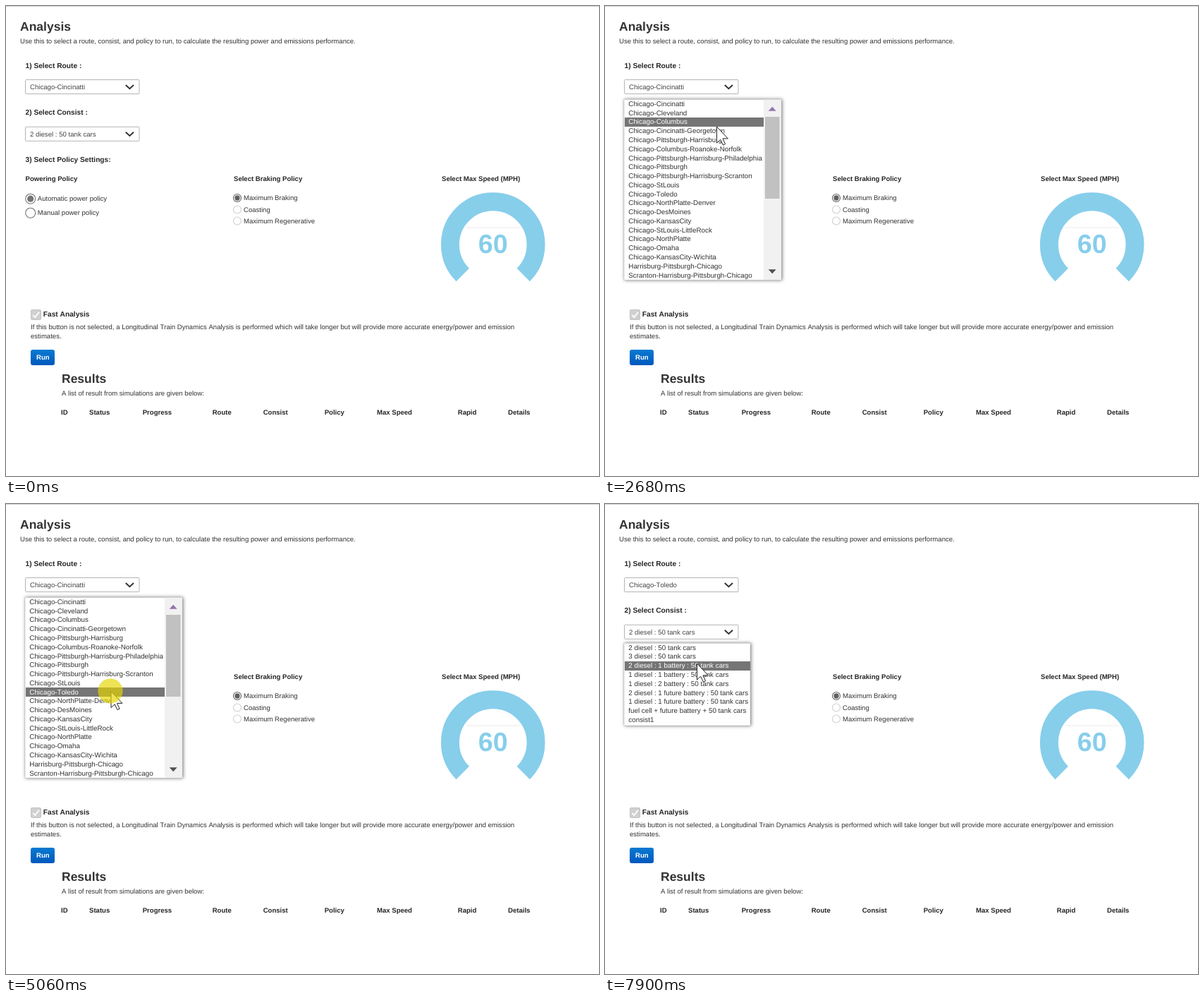
These frames come from a looping animation (841 by 666 pixels, 7.99 s). An HTML page:

```html
<!DOCTYPE html>
<html lang="en">
<head>
<meta charset="utf-8">
<title>Analysis</title>
<style>
  html, body { margin: 0; width: 100%; height: 100%; overflow: hidden; background: #fff; }
  svg { display: block; }
  text {
    font-family: "Liberation Sans", Arial, sans-serif;
    font-size: 9.57px;
    font-kerning: none;
    fill: #333;
    text-rendering: geometricPrecision;
    white-space: pre;
  }
  .title { font-size: 17.5px; font-weight: bold; }
  .head { font-size: 10.2px; font-weight: bold; fill: #262626; }
  .bold { font-weight: bold; fill: #262626; }
  .field { font-size: 9.63px; fill: #444; }
  .option { font-size: 9.83px; }
  .option.on { fill: #fff; }
  .speed { font-size: 37.5px; font-weight: bold; fill: #87ceeb; text-anchor: middle; }
  .run { font-weight: bold; fill: #fff; }
  .list { filter: drop-shadow(1px .7px 2.6px rgba(0, 0, 0, .55)); }
</style>
</head>
<body>
<svg id="stage" width="841" height="666" viewBox="0 0 841 666">
  <defs>
    <linearGradient id="blue" x1="0" y1="0" x2="0" y2="1">
      <stop offset="0" stop-color="#0a7ad2"/>
      <stop offset="1" stop-color="#0058bd"/>
    </linearGradient>
  </defs>
  <rect width="841" height="666" fill="#fff"/>
  <rect width="841" height="1" fill="#d2d2d2"/>
  <g id="page"></g>
  <g id="lists"></g>
  <path id="cursor" d="M.5 .5V23.6L5.7 18.8L9.4 26.6L12.6 25.2L9 17.4H16.4Z"
        fill="#fff" stroke="#222" stroke-width="1"/>
  <circle id="click" r="17.6"/>
</svg>
<script>
const LOOP = 7990, ROW = 12.77;
const $ = id => document.getElementById(id);
const page = $('page');

function add(parent, tag, attrs, text) {
  const el = document.createElementNS('http://www.w3.org/2000/svg', tag);
  for (const key in attrs) el.setAttribute(key, attrs[key]);
  if (text) el.textContent = text;
  parent.append(el);
  return el;
}
const label = (x, y, text, cls = '') => add(page, 'text', { x, y, class: cls }, text);

function select(y, text) {
  add(page, 'rect', { x: 27.5, y, width: 161.5, height: 20, rx: 1, fill: '#fff', stroke: '#b4b4b4' });
  add(page, 'path', { d: `M169.8 ${y + 7.5}L175.4 ${y + 12.7}L181 ${y + 7.5}`, fill: 'none', stroke: '#333', 'stroke-width': 2 });
  return label(34, y + 13.6, text, 'field');
}

function radio(x, y, r, color, on) {
  add(page, 'circle', { cx: x, cy: y, r, fill: '#fff', stroke: color, 'stroke-width': 1.1 });
  if (on) add(page, 'circle', { cx: x, cy: y, r: r * .66, fill: color });
}

function list(top, width, height, items, barAt) {
  const g = add($('lists'), 'g', {});
  add(g, 'rect', { x: 27, y: top, width, height, fill: '#fff', stroke: '#b8b8b8', 'stroke-width': .5, class: 'list' });
  const rowWidth = barAt ? barAt - 27.5 : width - 1;
  const bar = add(g, 'rect', { x: 27.5, width: rowWidth, height: ROW, fill: '#757575', 'shape-rendering': 'crispEdges' });
  const rows = items.map((text, i) =>
    add(g, 'text', { x: 33.3, y: top + ROW * i + 9.5, class: 'option' }, text));
  return {
    g,
    show(open, index) {
      g.style.display = open ? '' : 'none';
      bar.setAttribute('y', top + ROW * index);
      rows.forEach((row, i) => row.classList.toggle('on', i === index));
    }
  };
}

// Page
label(20, 35.3, 'Analysis', 'title');
label(20, 53.2, 'Use this to select a route, consist, and policy to run, to calculate the resulting power and emissions performance.');
label(27.5, 87.5, '1) Select Route :', 'head');
label(27.5, 154, '2) Select Consist :', 'head');
label(27.5, 221, '3) Select Policy Settings:', 'head');
const route = select(104.5, 'Chicago-Cincinatti');
select(171.3, '2 diesel : 50 tank cars');

label(27.5, 247.8, 'Powering Policy', 'bold');
radio(34.7, 273.2, 7, '#747474', true);
radio(34.7, 293.2, 7, '#747474');
label(44.8, 276, 'Automatic power policy');
label(44.8, 296, 'Manual power policy');

label(323, 247.8, 'Select Braking Policy', 'bold');
radio(328, 272, 5.5, '#606060', true);
radio(328, 288.5, 5.5, '#cfcfcf');
radio(328, 304.5, 5.5, '#cfcfcf');
label(337, 275.2, 'Maximum Braking');
label(337, 291.7, 'Coasting');
label(337, 307.5, 'Maximum Regenerative');

label(618, 247.8, 'Select Max Speed (MPH)', 'bold');
const arm = 60.8 * Math.SQRT1_2;
add(page, 'path', {
  d: `M${690.7 - arm} ${338 + arm}A60.8 60.8 0 1 1 ${690.7 + arm} ${338 + arm}`,
  fill: 'none', stroke: '#87ceeb', 'stroke-width': 26
});
add(page, 'rect', { x: 652, y: 313.5, width: 77, height: 1, fill: '#ececec' });
label(690.7, 350, '60', 'speed');

add(page, 'rect', { x: 35.5, y: 430.5, width: 14, height: 14, rx: 1.5, fill: '#d0d0d0', stroke: '#c4c4c4' });
add(page, 'path', { d: 'M38.3 437.8L41.3 441L47 433.7', fill: 'none', stroke: '#fff', 'stroke-width': 1.8 });
label(52.8, 440, 'Fast Analysis', 'head');
label(35, 458, 'If this button is not selected, a Longitudinal Train Dynamics Analysis is performed which will take longer but will provide more accurate energy/power and emission');
label(35, 470.5, 'estimates.');
add(page, 'rect', { x: 35, y: 487, width: 34, height: 22, rx: 3, fill: 'url(#blue)' });
label(43, 501, 'Run', 'run');

label(79, 534.2, 'Results', 'title');
label(79, 552, 'A list of result from simulations are given below:');
[[78, 'ID'], [118, 'Status'], [193.7, 'Progress'], [292.7, 'Route'], [364.7, 'Consist'],
 [451.7, 'Policy'], [526, 'Max Speed'], [640.8, 'Rapid'], [712, 'Details']]
  .forEach(([x, text]) => label(x, 578.5, text, 'bold'));

// Drop-down lists
const routes = list(132.4, 223, 255.8, [
  ...['Cincinatti', 'Cleveland', 'Columbus', 'Cincinatti-Georgetown', 'Pittsburgh-Harrisburg',
    'Columbus-Roanoke-Norfolk', 'Pittsburgh-Harrisburg-Philadelphia', 'Pittsburgh',
    'Pittsburgh-Harrisburg-Scranton', 'StLouis', 'Toledo', 'NorthPlatte-Denver', 'DesMoines',
    'KansasCity', 'StLouis-LittleRock', 'NorthPlatte', 'Omaha', 'KansasCity-Wichita'].map(s => 'Chicago-' + s),
  'Harrisburg-Pittsburgh-Chicago', 'Scranton-Harrisburg-Pittsburgh-Chicago'
], 225);
add(routes.g, 'rect', { x: 225, y: 132.7, width: 24.7, height: 255.2, fill: '#f1f1f1' });
add(routes.g, 'rect', { x: 227, y: 157, width: 20.5, height: 116, fill: '#c1c1c1' });
add(routes.g, 'path', { d: 'M231.7 148.8L237.2 142.8L242.7 148.8Z', fill: '#9273ae' });
add(routes.g, 'path', { d: 'M231.7 373.2L237.2 379.2L242.7 373.2Z', fill: '#505050' });

const consists = list(197.2, 179, 116.8, [
  '2 diesel : 50 tank cars', '3 diesel : 50 tank cars', '2 diesel : 1 battery : 50 tank cars',
  '1 diesel : 1 battery : 50 tank cars', '1 diesel : 2 battery : 50 tank cars',
  '2 diesel : 1 future battery : 50 tank cars', '1 diesel : 1 future battery : 50 tank cars',
  'fuel cell + future battery + 50 tank cars', 'consist1'
]);

// Pointer moves: first step, last step, step count, x, y, eased
const moves = [
  [280, 280, 1, 511, 445],
  [370, 370, 1, 409, 210],
  [590, 1200, 9, 163, 114, true],
  [2380, 2680, 5, 158, 170.5],
  [2755, 3130, 6, 147, 237],
  [3190, 3280, 2, 146, 248],
  [3490, 3730, 4, 145.5, 255],
  [3950, 4190, 4, 147, 258],
  [4500, 4660, 3, 148.5, 265],
  [5900, 6510, 9, 129, 174, true],
  [7240, 7900, 10, 130, 225.5, true]
];
// Click glow: start, end, colour
const clicks = [
  [1820, 1980, 'rgba(255, 255, 0, .55)'],
  [5060, 5180, 'rgba(228, 214, 0, .67)'],
  [6760, 6920, 'rgba(255, 255, 0, .55)']
];

function pointer(t) {
  let x = 511, y = 445;
  for (const [start, end, count, toX, toY, eased] of moves) {
    if (t < start) break;
    const gap = (end - start) / Math.max(1, count - 1);
    const step = t >= end ? count : 1 + Math.floor((t - start) / gap);
    let p = step / count;
    if (eased) p = p * p * (3 - 2 * p);
    x += (toX - x) * p;
    y += (toY - y) * p;
  }
  return [x, y];
}

const rowAt = (y, top) => Math.max(0, Math.floor((y - top) / ROW));

function draw(t) {
  const [x, y] = pointer(t);
  const cursor = $('cursor'), glow = $('click');
  cursor.style.display = t < 280 ? 'none' : '';
  cursor.setAttribute('transform', `translate(${x} ${y})`);

  const click = clicks.find(([start, end]) => t >= start && t < end);
  glow.setAttribute('fill', click ? click[2] : 'none');
  glow.setAttribute('cx', x - .5);
  glow.setAttribute('cy', y);

  routes.show(t >= 1820 && t < 5180, rowAt(y - .5, 132.4));
  consists.show(t >= 6760, rowAt(y, 197.2));
  route.textContent = t < 5180 ? 'Chicago-Cincinatti' : 'Chicago-Toledo';
}

const begin = performance.now();
function tick() {
  draw((performance.now() - begin) % LOOP);
  requestAnimationFrame(tick);
}
tick();
</script>
</body>
</html>
```
